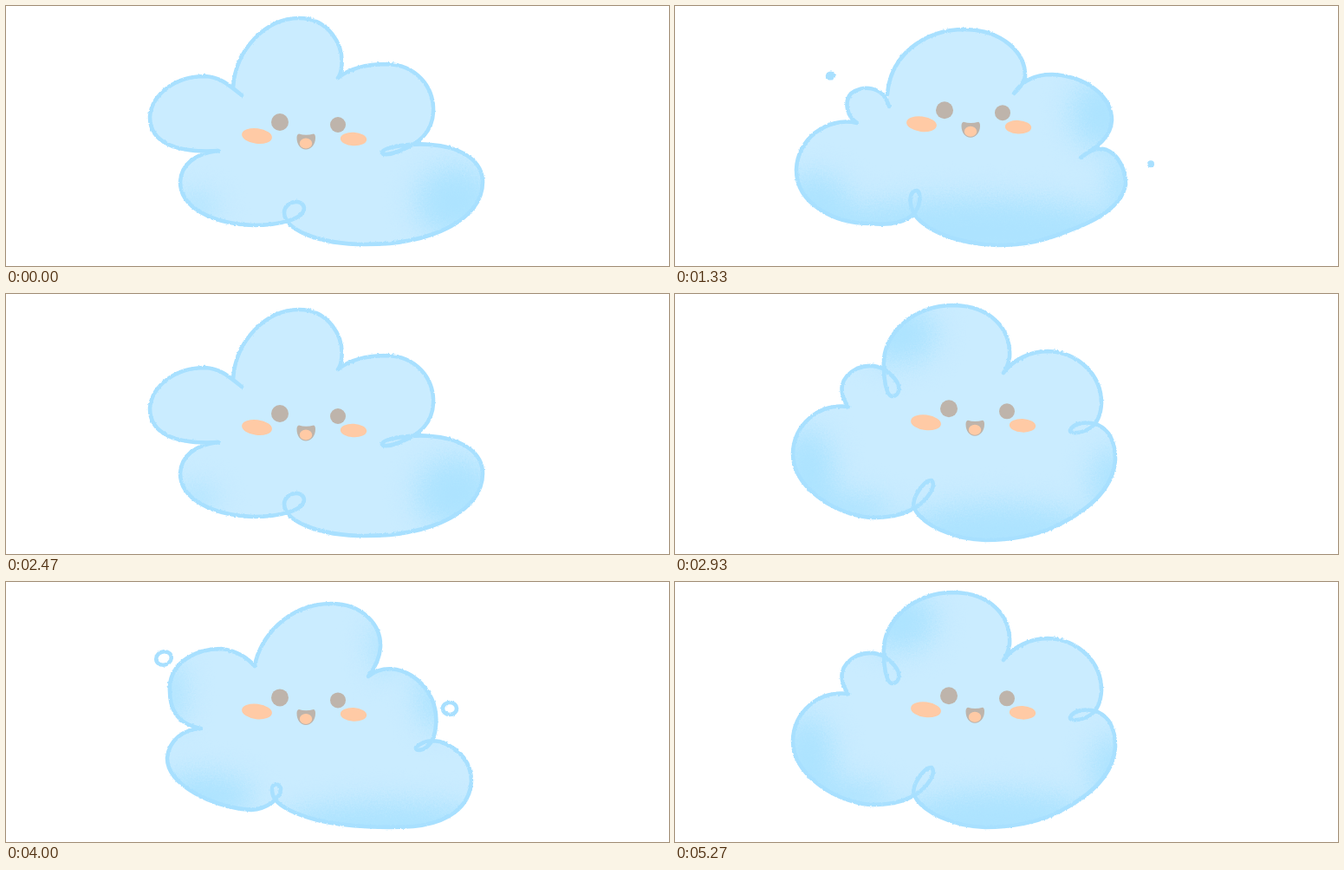
Write an HTML page that moves like this. It is 765 px wide and 300 px high and loops after 5310 ms.

```html
<!DOCTYPE html>
<html lang="en">
<head>
<meta charset="utf-8">
<title>Bobbing cloud</title>
<style>
html, body { margin: 0; width: 100%; height: 100%; overflow: hidden; background: #fff; }
svg { display: block; }
.body { fill: #caecff; }
.line { fill: none; stroke: #a8e0ff; stroke-width: 4.6; stroke-linecap: round; stroke-linejoin: round; }
.shade { fill: #ade3ff; }
.dark { fill: #beb4ab; }
.warm { fill: #ffcaa5; }
</style>
</head>
<body>
<svg id="stage" width="765" height="300" viewBox="0 0 765 300">
  <defs>
    <filter id="rough" filterUnits="userSpaceOnUse" x="100" y="-10" width="500" height="320" color-interpolation-filters="sRGB">
      <feTurbulence type="fractalNoise" baseFrequency=".35" numOctaves="2" seed="4"/>
      <feDisplacementMap in="SourceGraphic" scale="2.5" xChannelSelector="R" yChannelSelector="G"/>
    </filter>
    <filter id="grain" filterUnits="userSpaceOnUse" x="60" y="-40" width="580" height="400" color-interpolation-filters="sRGB">
      <feGaussianBlur in="SourceGraphic" stdDeviation="15" result="soft"/>
      <feTurbulence type="fractalNoise" baseFrequency=".6" numOctaves="2" seed="9"/>
      <feDisplacementMap in="soft" scale="26" xChannelSelector="R" yChannelSelector="G"/>
    </filter>
    <g id="face">
      <circle class="dark" cx="316" cy="134" r="10"/>
      <circle class="dark" cx="383" cy="137" r="9"/>
      <ellipse class="warm" cx="289.5" cy="150" rx="17.5" ry="8.8" transform="rotate(7 289.5 150)"/>
      <ellipse class="warm" cx="401" cy="153.5" rx="15.2" ry="7.8" transform="rotate(3 401 153.5)"/>
      <path class="dark" d="M338 147.5Q346 150 355 147.5Q357 148 357 152C357 160 352 165.500 346 165.500C340 165.500 335.500 160 335.500 152Q335.500 148 338 147.500Z"/>
      <ellipse class="warm" cx="346" cy="158.500" rx="7.200" ry="6"/>
    </g>
  </defs>
</svg>
<script>
// Each pose: outline, shading ellipses [cx, cy, rx, ry], face offset,
// extra drops, and the step at which it sits exactly as drawn.
const poses = [
  {
    from: 0, rest: 0, dir: 1, face: [0, 0],
    path: `M262 94C265 50 300 14 338 14C372 14 391 45 387 72Q386 79 383 83C395 73 415 67 440 67
      C472 68 494 92 493 122C492 147 475 160 452 168C442 172 433 172 434 169C436 162 470 158 490 160
      C528 163 550 180 550 203C550 246 492 275 415 275C360 275 321 258 321 238C322 224 343 222 344 233
      C344 246 315 253 285 253C235 251 201 231 201 203C202 183 218 170 245 167C195 170 166 157 166 128
      C168 102 195 81 230 81C247 82 257 91 272 103`,
    shades: [[518, 226, 46, 42], [218, 232, 26, 14]], drops: ''
  },
  {
    from: 5, rest: 5, dir: 1, face: [0, -.6],
    path: `M287 97C292 65 325 25 375 25C412 25 433 50 432 75C431 90 425 100 418 109C435 95 455 100 468 108
      C490 122 498 145 496 165Q495 182 486 190C480 195 472 195 473 191C480 184 490 182 500 184
      C525 192 537 210 537 230C535 260 510 278 470 282C440 284 395 283 360 275C330 267 312 258 308 246
      C304 232 314 230 317 238C318 250 300 262 283 263C240 260 186 235 186 203C188 182 205 170 225 169
      C195 163 188 145 189 120C191 92 220 77 248 77Q272 80 287 97`,
    shades: [[440, 283, 130, 30], [498, 130, 24, 42], [226, 248, 60, 28], [190, 130, 16, 40], [436, 75, 14, 34]],
    drops: `<ellipse class="body line" cx="182" cy="88" rx="9" ry="7.500" transform="rotate(-20 182 88)"/>
      <ellipse class="body line" cx="512" cy="146" rx="8" ry="7"/>`
  },
  {
    from: 10, rest: 13, dir: -1, face: [-5, -12.8],
    path: `M245 103C248 60 285 28 335 28C378 29 405 55 404 83Q400 94 391 102C400 88 415 80 435 80
      C475 82 504 105 504 133C503 152 488 163 468 176C480 166 490 164 498 167C512 173 520 190 520 207
      C515 235 480 251 455 260C425 272 405 277 372 277C330 276 290 262 276 241C268 225 272 214 279 214
      C285 216 283 236 273 243C262 252 245 254 225 252C185 252 140 230 140 190C141 155 175 128 210 136
      C198 128 195 112 203 102C215 92 240 92 247 117`,
    shades: [[340, 264, 190, 42], [494, 126, 38, 42], [160, 232, 44, 38], [520, 210, 20, 42]],
    drops: `<ellipse cx="179.500" cy="81.500" rx="5.800" ry="5" fill="#a8e0ff" transform="rotate(-20 179.500 81.500)"/>
      <circle cx="549" cy="183.300" r="4" fill="#a8e0ff"/>`
  },
  {
    from: 15, rest: 17, dir: -1, face: [0, -2.7],
    path: `M200 129C188 112 190 95 210 85C228 78 242 84 250 93C262 104 260 117 250 117C243 115 241 95 241 84
      C238 45 275 12 322 12C365 13 388 40 386 72Q384 83 379 90C390 75 410 65 430 65C465 66 492 92 492 125
      Q491 145 480 153C470 160 455 161 456 156C460 148 475 145 488 150C503 157 508 172 508 190
      C506 225 475 250 437 268C410 280 385 283 358 283C320 282 285 265 276 246C272 235 288 213 296 214
      C302 220 292 236 278 245C262 255 245 257 225 257C180 252 136 220 136 183C137 150 165 125 200 129`,
    shades: [[370, 278, 120, 38], [152, 212, 34, 58], [258, 46, 44, 34], [506, 220, 28, 44], [200, 250, 50, 20]],
    drops: ''
  }
];

const stage = document.getElementById('stage');
stage.insertAdjacentHTML('beforeend', poses.map((p, i) => `
  <g class="pose" visibility="hidden">
    <clipPath id="clip${i}"><path d="${p.path}"/></clipPath>
    <g filter="url(#rough)">
      <path class="body" d="${p.path}"/>
      <g clip-path="url(#clip${i})"><g filter="url(#grain)">
        ${p.shades.map(([x, y, rx, ry]) => `<ellipse class="shade" cx="${x}" cy="${y}" rx="${rx}" ry="${ry}"/>`).join('')}
      </g></g>
      <path class="line" d="${p.path}"/>
      ${p.drops}
    </g>
    <use href="#face" x="${p.face[0]}" y="${p.face[1]}"/>
  </g>`).join(''));
const groups = [...stage.querySelectorAll('.pose')];

const LOOP = 5310, CYCLE = 19, LAST_STEP = 131;

function draw(now) {
  // 25 steps per second, shown on a 30 per second clock
  const tick = Math.floor(now % LOOP * .03 + .15);
  const step = Math.min(LAST_STEP, Math.floor(tick * 5 / 6)) % CYCLE;
  const current = poses.findLastIndex(p => step >= p.from);
  groups.forEach((g, i) => g.setAttribute('visibility', i === current ? 'visible' : 'hidden'));
  const { rest, dir } = poses[current];
  groups[current].setAttribute('transform', `translate(0 ${dir * (step - rest)})`);
}

const start = performance.now();
function loop() {
  draw(performance.now() - start);
  requestAnimationFrame(loop);
}
loop();
</script>
</body>
</html>
```
